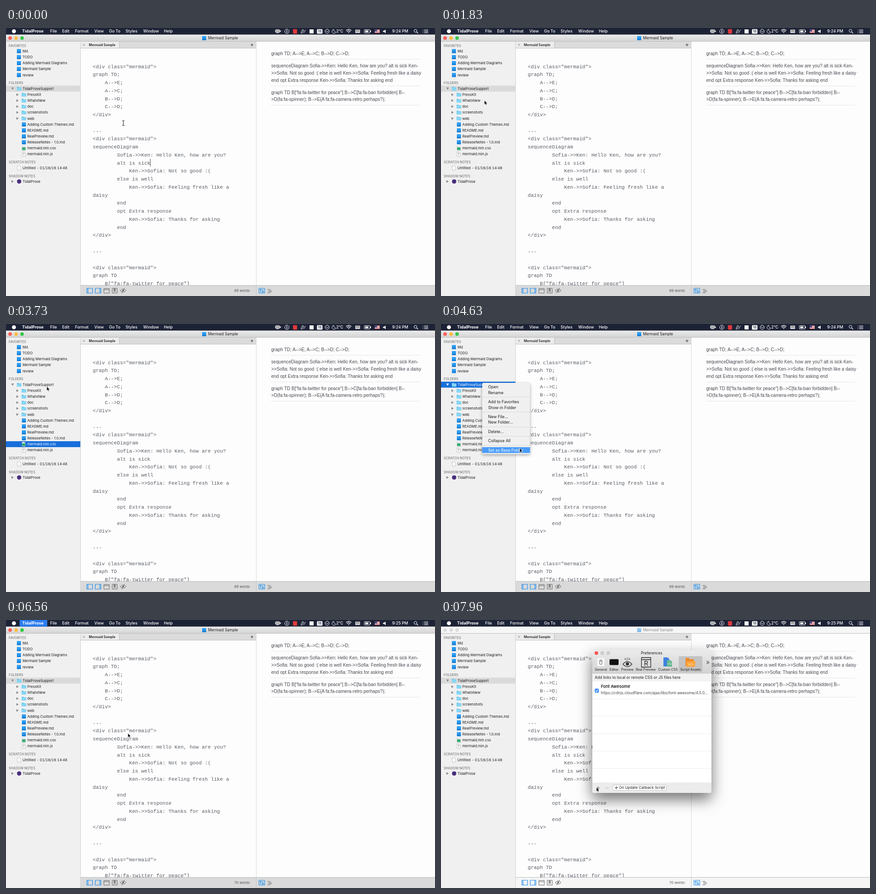
Recreate the animation shown at these times as an HTML page. Size 947 px wide and 592 px high, loop 8 s.

```html
<!DOCTYPE html>
<html lang="en">
<head>
<meta charset="utf-8">
<title>Mermaid Sample</title>
<style>
html, body { margin: 0; height: 100%; overflow: hidden; }
svg { display: block; width: 100vw; height: 100vh; --chrome: url(#bar); --foot: #dadada; --strip: #dbdbdb; }
svg.idle { --chrome: #f6f6f6; --foot: #f5f5f5; --strip: #e0e0e0; }
text { font-family: Inter, Roboto, sans-serif; white-space: pre; fill: #1c1c1c; }
.code text { font-family: "Liberation Mono", monospace; fill: #595e67; }
.page text { font-family: "Liberation Sans", Arial, sans-serif; fill: #484a52; }
.menu text { fill: #fff; font-weight: 500; }
.head { font-weight: 500; fill: #777; }
.mid { text-anchor: middle; }
.row > rect:first-child { fill: none; }
.row.dim > rect:first-child { fill: #dadada; }
.row.sel > rect:first-child { fill: #176fdb; }
.row.sel text, .row.sel .tri, .item.on text { fill: #fff; }
.item rect { fill: none; }
.item.on rect { fill: #4a9cfa; }
.idle .title { opacity: .5; }
.idle .light { fill: #dcdcdc; }
.cast { filter: drop-shadow(0 14px 16px rgba(0,0,0,.55)); }
.cast.small { filter: drop-shadow(0 2px 3px rgba(0,0,0,.35)); }
</style>
</head>
<body>
<svg id="stage" viewBox="0 0 947 592"></svg>
<script>
const T = (x, y, s, size = 7.85, attr = '') =>
  `<text x="${x}" y="${y + size * .36}" font-size="${size}" ${attr}>${s.replace(/</g, '&lt;')}</text>`;
const R = (x, y, w, h, fill, attr = '') =>
  `<rect x="${x}" y="${y}" width="${w}" height="${h}" fill="${fill}" ${attr}/>`;
const C = (x, y, r, fill, attr = '') => `<circle cx="${x}" cy="${y}" r="${r}" fill="${fill}" ${attr}/>`;
const P = (d, stroke, w = 1, fill = 'none') =>
  `<path d="${d}" stroke="${stroke}" stroke-width="${w}" fill="${fill}"/>`;
const G = (id, body) => `<g id="${id}">${body}</g>`;

const docIcon = (x, y) => R(x, y - 4.5, 9, 9, '#2b9cf2', 'rx=".8"') + R(x, y + 1, 9, 3.5, '#1b7fd6', 'rx=".8"');
const folderIcon = (x, y) =>
  P(`M${x} ${y - 4}h4l1 1.2h5v7h-10z`, 'none', 0, '#6fc9ee') + R(x, y - 1.8, 10, 6, '#86d6f5');
const pageIcon = (x, y, fill) =>
  P(`M${x} ${y - 4.7}h5l2.5 2.5v7h-7.5z`, '#999', .6, '#fff') + (fill ? R(x + .3, y - 2, 7, 6, fill) : '');
const triangle = (x, y, open) =>
  `<path class="tri" fill="#8a8a8a" d="${open ? `M${x - 3} ${y - 2.5}h6l-3 5z` : `M${x - 2} ${y - 3}v6l5 -3z`}"/>`;

// Sidebar
const folders = ['PressKit', 'WhatsNew', 'doc', 'screenshots', 'web'];
const files = ['Adding Custom Themes.md', 'README.md', 'RealPreview.md', 'ReleaseNotes - 1.0.md'];
const row = (i, body) => {
  const y = 134 + 13.15 * i;
  return `<g class="row">${R(0, y - 6.6, 164, 13.1, 'none')}${body(y)}</g>`;
};
const heading = (y, s) => T(6, y, s, 7.1, 'class="head"');
const sidebar = R(0, 30, 164.5, 562, '#f0f0f0') +
  heading(39, 'FAVORITES') + heading(121.7, 'FOLDERS') +
  heading(296.5, 'SCRATCH NOTES') + heading(327, 'SHADOW NOTES') +
  ['Md', 'TODO', 'Adding Mermaid Diagrams', 'Mermaid Sample', 'review'].map((s, i) =>
    docIcon(24, 51 + 13.2 * i) + T(36.5, 51 + 13.2 * i, s)).join('') +
  row(0, y => triangle(14.5, y, true) + folderIcon(24, y) + T(36.5, y, 'TidalProseSupport')) +
  folders.map((s, i) => row(i + 1, y => triangle(25, y) + folderIcon(34.5, y) + T(47, y, s))).join('') +
  files.map((s, i) => row(i + 6, y => docIcon(35, y) + T(47, y, s))).join('') +
  row(10, y => pageIcon(35.5, y, '#2fa872') + T(47, y, 'mermaid.min.css')) +
  row(11, y => pageIcon(35.5, y) + T(39, y + .5, '?', 6, 'class="mid"') + T(47, y, 'mermaid.min.js')) +
  pageIcon(25, 309) + T(36.5, 309, 'Untitled - 01/16/16 14:48', 7.85, 'style="font-feature-settings:\'tnum\'"') +
  triangle(14, 339) + C(29, 339, 4.8, '#4a2f7d') + T(36.5, 339, 'TidalProse') +
  P('M164.5 30V592', '#cfcfcf');

// Editor
const source = `<div class="mermaid">
graph TD;
    A-->E;
    A-->C;
    B-->D;
    C-->D;
</div>

---
<div class="mermaid">
sequenceDiagram
        Sofia->>Ken: Hello Ken, how are you?
        alt is sick
            Ken->>Sofia: Not so good :(
        else is well
            Ken->>Sofia: Feeling fresh like a
daisy
        end
        opt Extra response
            Ken->>Sofia: Thanks for asking
        end
</div>

---

<div class="mermaid">
graph TD
    B["fa:fa-twitter for peace"]`.split('\n');
const editor = R(165, 44, 387, 525, '#fdfdfd') +
  `<g class="code">${source.map((s, i) => T(191.5, 84.5 + 17.76 * i, s, 11.15)).join('')}</g>` +
  G('caretA', P('M318.5 289V306', '#444')) + G('caretB', P('M192 200V217.5', '#444')) +
  G('scroll', R(546.5, 45, 4.5, 411, '#7c7c7c', 'rx="2.2"')) +
  R(165, 30, 387.5, 14, 'var(--strip)') + R(165, 30, 85, 14, '#ececec') +
  P('M250.5 30V44M165 44.5H552.5', '#bdbdbd') + P('M170 35l4.4 4.4m0 -4.4l-4.4 4.4', '#777', .8) +
  T(183, 37.3, 'Mermaid Sample', 7.2, 'font-weight="600"') + P('M540 37.3h6m-3 -3v6', '#333');

// Preview
const rule = y => `<path d="M585 ${y}H914" stroke="#cfcfcf" stroke-dasharray="1 1"/>`;
const para = (y, ...lines) => lines.map((s, i) => T(585.5, y + 15.7 * i, s, 10.1)).join('');
const preview = R(552.5, 30, 395, 539, '#fdfdfd') + P('M552.5 30V592', '#d9d9d9') + '<g class="page">' +
  para(56.2, 'graph TD; A-->E; A-->C; B-->D; C-->D;') + rule(69) +
  para(83.5, 'sequenceDiagram Sofia->>Ken: Hello Ken, how are you? alt is sick Ken-',
    '>>Sofia: Not so good :( else is well Ken->>Sofia: Feeling fresh like a daisy',
    'end opt Extra response Ken->>Sofia: Thanks for asking end') + rule(128) +
  para(142, 'graph TD B["fa:fa-twitter for peace"] B-->C[fa:fa-ban forbidden] B--',
    '>D(fa:fa-spinner); B-->E(A fa:fa-camera-retro perhaps?);') + rule(170.5) + '</g>';

// Bottom bar
const blue = '#1c8cf0', gray = '#666';
const footer = R(165, 568.5, 782, 23.5, 'var(--foot)') + P('M165 568.5H947', '#bcbcbc') + P('M552.5 569V592', '#c6c6c6') +
  P('M178.5 575h12.5v10.5h-12.5zM181 575v10.5M197 575h12.5v10.5h-12.5zM207 575v10.5', blue, 1.2) +
  P('M216 575.5h12v10h-12zM216 578h12M234.5 575h11v10.5h-11z', gray) + T(240, 580.4, 'R', 8.5, 'class="mid"') +
  P('M252 580q6.5 -7 13 0q-6.5 7 -13 0M255 586l7 -12', gray) + C(258.5, 580, 2, gray) +
  T(504, 580, '69 words', 7.8, 'id="words" style="fill:#555"') +
  P('M558.5 575h12.5v10.5h-12.5zM562.5 584V577m-2 2l2 -2l2 2M567 577v7m-2 -2l2 2l2 -2', blue, 1.2) +
  P('M577 577.5h7M579 580h8M579 582.5h8M577 585h7', gray, .9);

// Title and menu bars
const menus = { File: 97.5, Edit: 124, Format: 152.5, View: 195, 'Go To': 227.5, Styles: 264, Window: 303, Help: 348.5 };
const ink = '#1d2336';
const header = R(0, 14, 947, 16, 'var(--chrome)') + P('M0 29.5H947', '#bcbcbc') +
  ['#fc5f5a', '#fdbc40', '#34c84a'].map((c, i) => C(9 + 13.2 * i, 22.2, 3.9, c, 'class="light"')).join('') +
  `<g class="title">${docIcon(433, 22.4)}${T(446, 22.4, 'Mermaid Sample', 8.3)}</g>`;
const menubar = '<g class="menu">' + R(0, 0, 947, 14.5, ink) + G('app', R(30, 0, 61, 14.5, '#2b7cf0')) +
  C(17.5, 7.2, 4.4, '#fff') + T(35.5, 7.2, 'TidalProse', 9.1, 'style="font-weight:700"') +
  Object.entries(menus).map(([s, x]) => T(x, 7.2, s, 8.9)).join('') +
  P('M594.5 5h10v3q-1 3 -5 3q-4 0 -5 -3zM595 3.5h9M604 6h2.5v2h-2.5', '#ddd', 1, '#aaa') +
  C(620, 7.2, 4.7, 'none', 'stroke="#fff"') + P('M620 4.5v5.5', '#fff', 1.4) +
  R(633.5, 2.5, 9, 10, '#e0393e', 'rx="1"') +
  P('M651 10l4 -7l2 2l-4 7zM657 11l4 -7', '#fff', 1) + R(670, 3, 9, 9, '#fff', 'rx="1"') +
  R(686.5, 2.5, 12, 10, '#fff', 'rx="1.5"') + T(692.5, 7.7, '18', 7.5, `class="mid" style="fill:${ink}"`) +
  C(709, 7.2, 4.5, 'none', 'stroke="#fff"') + P('M706 6q3 4 6 0', '#fff') +
  P('M724 3a4.3 4.3 0 1 0 4 6a4.5 4.5 0 0 1 -4 -6', '#fff', .9) + T(729, 7.2, '2℃', 8.6) +
  P('M750.5 5.5q6 -5 12 0M752.5 8q4 -3.5 8 0M755 10.2q1.5 -1 3 0', '#fff', 1.3) +
  R(771, 3.5, 10.5, 7.5, '#ddd') + P('M773 4v5M775 4v5M777 4v5M779 4v5', '#444', .7) +
  R(791, 3.5, 12.5, 7.5, 'none', 'stroke="#fff" rx="1"') + R(793, 5.3, 7, 4, '#fff') + R(804, 5.5, 1.5, 3.5, '#fff') +
  R(814, 3.5, 11, 7.5, '#f4f4f4') + P('M814 4h11M814 6.2h11M814 8.4h11M814 10.5h11', '#d6444c') + R(814, 3.5, 5, 4, '#37478f') +
  P('M832.5 5.7h2.5l3 -2.5v8.2l-3 -2.5h-2.5z', 'none', 0, '#fff') +
  T(852.5, 7.2, '9:24 PM', 8.8, 'id="clock"') +
  C(904, 6.2, 3.2, 'none', 'stroke="#fff"') + P('M906.3 8.5l3.3 3.3', '#fff', 1.3) +
  P('M920 4h1M923 4h9M920 7.2h1M923 7.2h9M920 10.4h1M923 10.4h9', '#fff', 1.2) + '</g>';

// Context menu
const items = { Open: 139, Rename: 151.5, 'Add to Favorites': 172, 'Show in Folder': 184.5, 'New File...': 204.7,
  'New Folder...': 217.2, 'Delete...': 238, 'Collapse All': 258.2, 'Set as Base Folder': 278.5 };
const itemYs = Object.values(items);
const popup = R(91, 130, 105.5, 157.5, '#f0f0f0', 'rx="3" class="cast small"') +
  P([161.5, 194.5, 227.5, 248, 268.5].map(y => `M91 ${y}h105.5`).join(''), '#d8d8d8') +
  Object.entries(items).map(([s, y]) => `<g class="item">${R(91, y - 6.4, 105.5, 12.8, 'none')}${T(104, y, s, 8.9)}</g>`).join('');

// Preferences window
const tools = { General: 495, Editor: 524, Preview: 553.5, 'Real Preview': 594, 'Custom CSS': 643, 'Script Assets': 693 };
const prefs = R(476, 66, 263, 316, '#fff', 'rx="4" class="cast"') +
  P('M476 118V70q0 -4 4 -4h255q4 0 4 4v48z', 'none', 0, 'url(#bar)') + P('M476 118H739', '#bababa') +
  C(485, 73, 4, '#fc5753') +
  [498, 511.3].map(x => C(x, 73, 3.9, '#cfcfcf', 'stroke="#bbb" stroke-width=".5"')).join('') +
  T(607, 73.3, 'Preferences', 8.3, 'class="mid"') + R(667, 80, 52, 35.5, '#c3c3c3', 'rx="2"') +
  Object.entries(tools).map(([s, x]) => T(x, 109.3, s, 7.3, 'class="mid"')).join('') +
  R(487, 84, 15.5, 18, '#f8f8f8', 'rx="2"') + R(492, 88, 5.5, 10, '#eee', 'rx="1.5" stroke="#666"') + P('M493.5 90.5h2.5', '#555', 1.5) +
  R(514, 86.5, 20, 13, '#111', 'rx="2"') +
  T(553.5, 86, '</>', 8.5, 'class="mid"') + P('M543.5 97.5q10 -11 20 0q-10 11 -20 0z', '#333', 1.4) + C(553.5, 97, 3.6, '#333') +
  P('M584.5 83h20.5v21h-20.5zM584.5 87.5h20.5', '#222', 1.3) + T(594.8, 96, 'R', 14, 'class="mid"') +
  P('M633 82.5h9l4 4v16h-13z', 'none', 0, '#3f83dc') + P('M641 89h8l3 3v11h-11z', 'none', 0, '#66b98e') +
  T(646.5, 97, 'CSS', 4.5, 'class="mid" style="fill:#fff"') +
  P('M682 84h7l2 2.5h9v16h-18z', 'none', 0, '#f08a24') + P('M685 91h19l-2 12.5h-19z', 'none', 0, '#ffa63d') +
  T(693.5, 97, '</>', 7, 'class="mid" style="fill:#fff"') + T(731, 92.5, '»', 14, 'class="mid" style="fill:#555"') +
  R(476, 118.5, 263, 17.5, '#f3f3f3') + T(481.5, 127, 'Add links to local or remote CSS or JS files here', 8.4) +
  P([174.5, 212.5, 251.5, 289.5, 327.5].map(y => `M476 ${y}h263`).join(''), '#ececec') +
  R(481.5, 151.5, 9, 9, '#3a8cf6', 'rx="1.8"') + P('M483.7 156l1.8 2.2l3 -4.7', '#fff', 1.2) +
  T(495, 146.8, 'Font Awesome', 9.2, 'font-weight="500" style="fill:#000"') +
  T(495, 161.3, 'https://cdnjs.cloudflare.com/ajax/libs/font-awesome/4.5.0...', 8.35, 'style="fill:#444"') +
  P('M476 359H739V378q0 4 -4 4H480q-4 0 -4 -4z', 'none', 0, '#ececec') +
  P('M485 371h7.5m-3.75 -3.75v7.5', '#555') + P('M504.5 371h7.5', '#aaa') +
  R(521, 364.5, 118.5, 12, '#fff', 'rx="2.5" stroke="#b5b5b5" stroke-width=".8"') +
  P('M525.5 370.5h7m-3.5 -3.5v7', '#333') + T(535, 370.3, 'On Update Callback Script', 8.15);

const stage = document.getElementById('stage');
stage.innerHTML = `<defs><linearGradient id="bar" x2="0" y2="1">
  <stop stop-color="#ebebeb"/><stop offset="1" stop-color="#d3d3d3"/></linearGradient></defs>` +
  sidebar + editor + preview + footer + header + menubar + G('popup', popup) + G('prefs', prefs) +
  G('arrow', P('M0 0V9.6L2.2 7.6L3.7 11L5.3 10.3L3.9 7.1H6.9Z', '#fff', .7, '#111')) +
  G('beam', P('M-2.5 -5.5Q0 -5.5 0 -4V4Q0 5.5 -2.5 5.5M2.5 -5.5Q0 -5.5 0 -4M2.5 5.5Q0 5.5 0 4', '#222', 1.1));

const $ = id => document.getElementById(id);
const rows = [...document.querySelectorAll('.row')];
const entries = [...document.querySelectorAll('.item')];
const show = (id, on) => { $(id).style.display = on ? '' : 'none'; };
const move = (id, x, y) => $(id).setAttribute('transform', `translate(${x} ${y})`);
const ease = p => p * p * (3 - 2 * p);

// Pointer stops: time, x, y
const path = [[330, 259, 210], [560, 552, 150], [720, 720, 35], [860, 880, 90], [1000, 790, 160], [1140, 731, 136],
  [1170, 731, 136], [1400, 480, 90], [1560, 250, 50], [1750, 110, 120], [1960, 67, 240], [2000, 67, 240],
  [2250, 75, 277], [2540, 94, 268], [2580, 94, 268], [2800, 84, 245], [2860, 84, 245], [2960, 80, 264],
  [3200, 80, 264], [3660, 90, 140], [3700, 90, 140], [3800, 90, 131], [3900, 92, 132], [4500, 150, 204],
  [4530, 150, 204], [4620, 173.5, 274], [5730, 173.5, 274], [6030, 269, 250], [6900, 269, 250],
  [7300, 481, 71], [7410, 481, 71], [7450, 540, 74], [7600, 398, 74], [7700, 398, 340], [7730, 398, 340], [7950, 343, 369.5]];

function pointer(t) {
  const i = path.findIndex(k => k[0] > t);
  if (i < 0) return path.at(-1).slice(1);
  if (!i) return path[0].slice(1);
  const [a, b] = [path[i - 1], path[i]];
  const p = ease((t - a[0]) / (b[0] - a[0]));
  return [a[1] + (b[1] - a[1]) * p, a[2] + (b[2] - a[2]) * p];
}

function draw(t) {
  const [x, y] = pointer(t);
  const beam = (t < 1960 && x > 165 && x < 548) || (t >= 6900 && t < 7440);
  show('beam', beam);
  show('arrow', !beam);
  move(beam ? 'beam' : 'arrow', x, y);

  show('caretA', t < 130);
  show('caretB', t >= 130 && t < 1700);
  show('scroll', t >= 560 && t < 1800);
  $('scroll').style.opacity = Math.min(1, (1800 - t) / 250);

  const active = t < 2280 || t >= 3820 ? 0 : t < 2960 ? 11 : 10;
  const focus = t >= 2280 && t < 5730;
  rows.forEach((r, i) => { r.setAttribute('class', 'row' + (i === active ? focus ? ' sel' : ' dim' : '')); });

  show('popup', t >= 3860 && t < 5520);
  $('popup').style.opacity = Math.min(1, (5520 - t) / 100);
  const blink = t >= 5360 && t < 5400;
  entries.forEach((e, i) => e.classList.toggle('on', !blink && x > 93 && Math.abs(y + 1 - itemYs[i]) < 6.4));

  $('words').textContent = (t < 5400 ? 69 : 70) + ' words';
  $('clock').textContent = t < 5900 ? '9:24 PM' : '9:25 PM';
  show('app', t >= 6430 && t < 6600);
  stage.classList.toggle('idle', t >= 6600);
  show('prefs', t >= 6600);
  move('prefs', -142 * ease(Math.min(1, Math.max(0, (t - 7450) / 150))), 0);
}

function tick(now) {
  draw(now % 8000);
  requestAnimationFrame(tick);
}
draw(0);
requestAnimationFrame(tick);
</script>
</body>
</html>
```
